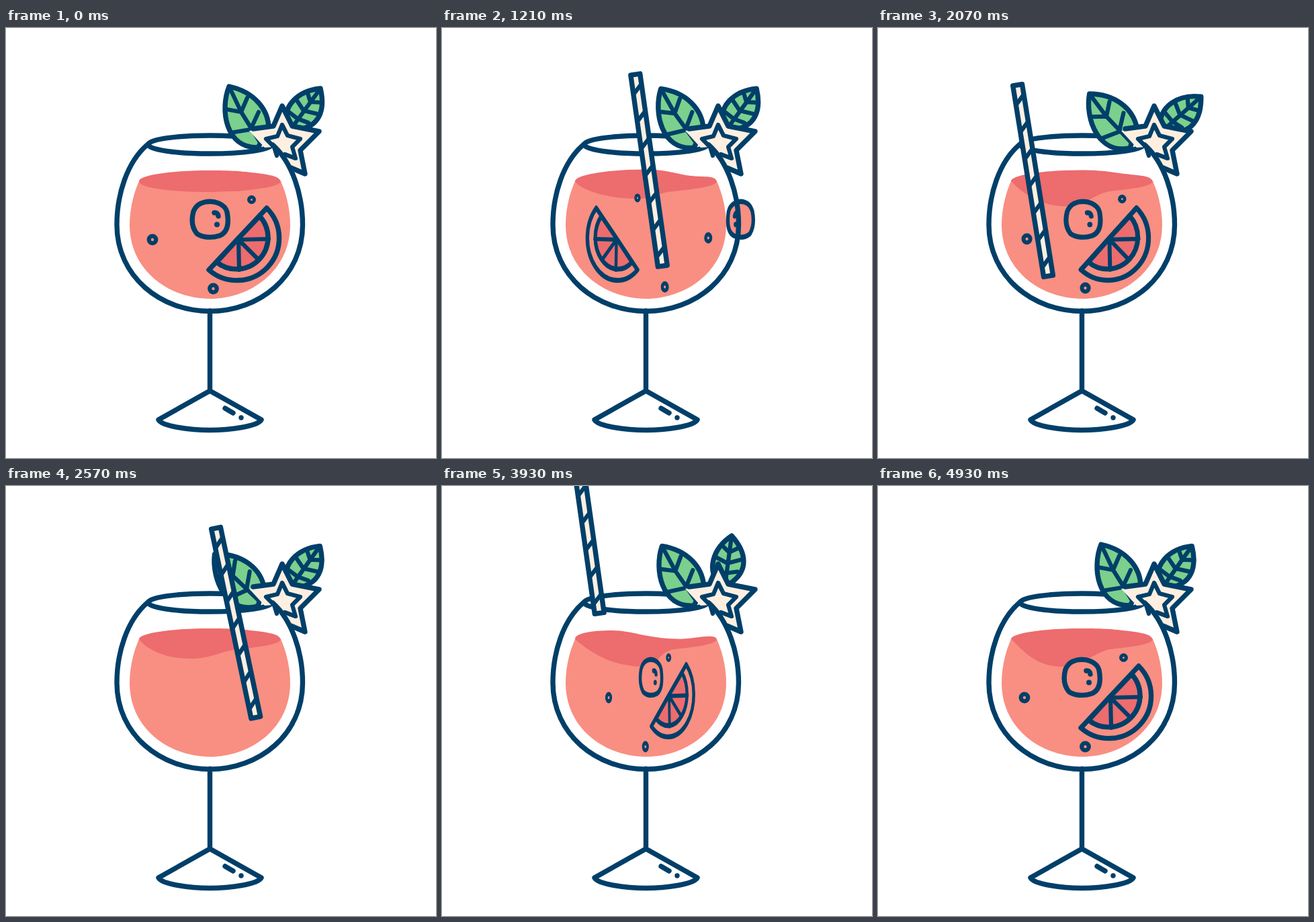
These frames come from a looping animation (640x640 px, 5 s). An HTML page:

```html
<!DOCTYPE html>
<html lang="en">
<head>
<meta charset="utf-8">
<title>Cocktail</title>
<style>
  html, body { margin: 0; height: 100%; overflow: hidden; background: #fff; }
  svg { display: block; width: 100vw; height: 100vh; }
  .line { fill: none; stroke: #003f69; stroke-width: 7.4; stroke-linecap: round; stroke-linejoin: round; }
  .thin { stroke-width: 6.2; }
  .cream { fill: #feefe1; }
  .leaf { fill: #7bd08d; }
  .juice { fill: #f88f82; }
  .pulp { fill: #ed6c6e; }
  .ink { fill: #003f69; }
</style>
</head>
<body>
<svg viewBox="0 0 640 640">
  <path class="juice" d="M198 228C189 248 184 272 184 293C184 362 244 403 303.500 403S423 362 423 293C423 272 418 248 409 228Z"/>
  <path id="surface" class="pulp"/>

  <g id="ball">
    <path class="line juice" d="M296 259C310 256 326 262 329 274C332 290 330 304 318 309C306 313 292 312 284 306C276 296 276 284 279 273C283 264 288 261 296 259Z"/>
    <path class="line" d="M310 275Q315 274 316 280"/>
    <circle class="ink" cx="314" cy="292.500" r="4"/>
  </g>
  <g id="slice">
    <path class="line juice" d="M388 268A63 63 0 0 1 302 360Z"/>
    <path class="line pulp" d="M377.500 280A47 47 0 0 1 313.500 348.500L345 314Z"/>
    <path class="line thin" d="M388 268L302 360M346 315L391 314M346 315L376 345M346 315L347 360"/>
  </g>
  <g id="dots">
    <circle class="line thin juice" cx="218" cy="315" r="5.300"/>
    <circle class="line juice" style="stroke-width:5" cx="365.500" cy="255.500" r="4"/>
    <circle class="line thin juice" cx="308.500" cy="388" r="5.300"/>
  </g>

  <ellipse class="line" cx="303.500" cy="173.500" rx="92" ry="13.500"/>
  <path class="line" d="M303.500 421V540L227 583C232 593 275 598.500 303.500 598.500S375 593 380 583L303.500 540M326 566L338 573M350 580h.01"/>

  <g id="leftLeaf">
    <path class="line leaf" d="M332 87C318 122 327 179 375 178L391 150C391 122 370 95 332 87Z"/>
    <path class="line thin" d="M332 87L350 125L378 170M328 121L350 125L359 104M334 156L364 151L376 125"/>
  </g>
  <g id="rightLeaf">
    <path class="line leaf" d="M468 90C436 93 408 116 419 150L435 151C465 147 476 124 468 90Z"/>
    <path class="line thin" d="M468 90L428 145M449 97L453 110L471 111M433 108L443 123L464 128M421 125L434 135L450 141"/>
  </g>

  <path class="cream" d="M362 153L398 147L411 116L426 146L466 154L438 182L445 217L421 207L398 177L385 178Z"/>
  <path class="line" d="M210 174C180 200 165 248 165 293C165 370 230 421.500 303.500 421.500S441.500 370 441.500 293C441.500 248 426 200 397 174"/>
  <path class="line" d="M368 150L398 146L411 116L426 146L466 154L438 182L445 217L424 208"/>
  <path class="line thin" d="M403 190L399 177L387 165L404 161L411 144L419 160L438 165L426 177L431 194L415 188"/>

  <g id="straw">
    <path class="line cream" d="M-7 0V-288H7V0Z"/>
    <path id="stripes" class="line thin"/>
  </g>
</svg>
<script>
const FPS = 14, TICKS = 70;
const { PI, sin, cos, exp, max, min } = Math;
const el = id => document.getElementById(id);
const move = (id, value) => el(id).setAttribute('transform', value);
const ramp = (t, from, to) => min(1, max(0, (t - from) / (to - from)));
const smooth = p => p * p * (3 - 2 * p);
const bell = (t, center, width) => exp(-(((t - center) / width) ** 2));

// Slides in from above, stirs two turns, slides out again
function drawStraw(t) {
  const turn = ramp(t, 12, 45.6) * 4 * PI, c = cos(turn), s = sin(turn);
  const lift = 375 * ((1 - ramp(t, 2, 11)) ** 2 + (max(0, t - 46) / 13) ** 2);
  const x = 318 - 64 * c - 9 * s - .11 * lift;
  const y = 355.5 + 13.5 * c + 2.8 * s - lift;
  const tilt = 11.8 - 2.3 * c - 4.6 * s - .008 * lift;
  move('straw', `translate(${x} ${y}) rotate(${-tilt})`);
}

// Pieces swirl twice around a vertical axis, slowing down
function drawPieces(t) {
  const swirl = 1 - (1 - ramp(t, 10, 65)) ** 1.5326;
  const flip = cos(4 * PI * swirl * smooth(ramp(t, 11, 17)));
  const place = (id, offset, drift = 0) => {
    move(id, `matrix(${flip} 0 0 1 ${(294 + offset) * (1 - flip)} ${drift})`);
    el(id).style.display = Math.abs(flip) < .01 ? 'none' : '';
  };
  place('ball', 1560 / max(t, 12));
  place('slice', .8 * t - 12, -11 * bell(t, 45, 8));
  place('dots', max(0, 45 - t), -7 * bell(t, 22, 5));
}

function drawLeaves(t) {
  const left = -15 * sin(PI * ramp(t, 6, 57) ** 1.6);
  const right = 13 * bell(t, 28, 5) - 33 * bell(t, 51.5, 9);
  move('leftLeaf', `rotate(${left} 378 178)`);
  move('rightLeaf', `rotate(${right} 418 155)`);
}

// Two sloshes ripple the back edge while the front edge sinks
function drawSurface(t) {
  const early = bell(t, 22, 5), late = bell(t, 55, 5), wave = early + late;
  const crestX = 303 - 51 * late, crestY = 212 - 4 * early + 3 * late;
  const dipX = 370 - 20 * late, dipY = 215.6 + 12 * wave;
  const lowX = 274 + 48 * early + 29 * late + 29 * bell(t, 0, 5);
  const depth = 25 * smooth(ramp(t, 4, 34)) - 12 * bell(t, 36, 5), lowY = 244 + depth;
  const bendX = max(345, lowX + 35);
  el('surface').setAttribute('d', `M198 228C198 219 ${crestX - (crestX - 198) * .55} ${crestY} ${crestX} ${crestY}`
    + `C${crestX + 32} ${crestY} ${dipX - 20 - 30 * late} ${dipY - 2.5 + wave} ${dipX} ${dipY}`
    + `C${dipX + 22} ${dipY + 3 - wave * 2} ${405 + wave} ${220 - wave * 2} 409 228`
    + `C409 236 ${bendX + 28} 240 ${bendX} 243`
    + `C${bendX - 25} ${243 + depth * .2} ${lowX + (bendX - lowX) * .45} ${lowY} ${lowX} ${lowY}`
    + `C${lowX - (lowX - 198) * .57} ${lowY} ${198 + depth * .5} 238 198 228Z`);
}

el('stripes').setAttribute('d', Array.from({ length: 7 },
  (_, i) => `M-6 ${-15 - 40.8 * i}l12 -12`).join(''));

function loop() {
  const t = Math.floor((performance.now() + 5) * FPS / 1000) % TICKS;
  drawStraw(t);
  drawPieces(t);
  drawLeaves(t);
  drawSurface(t);
  requestAnimationFrame(loop);
}
loop();
</script>
</body>
</html>
```
